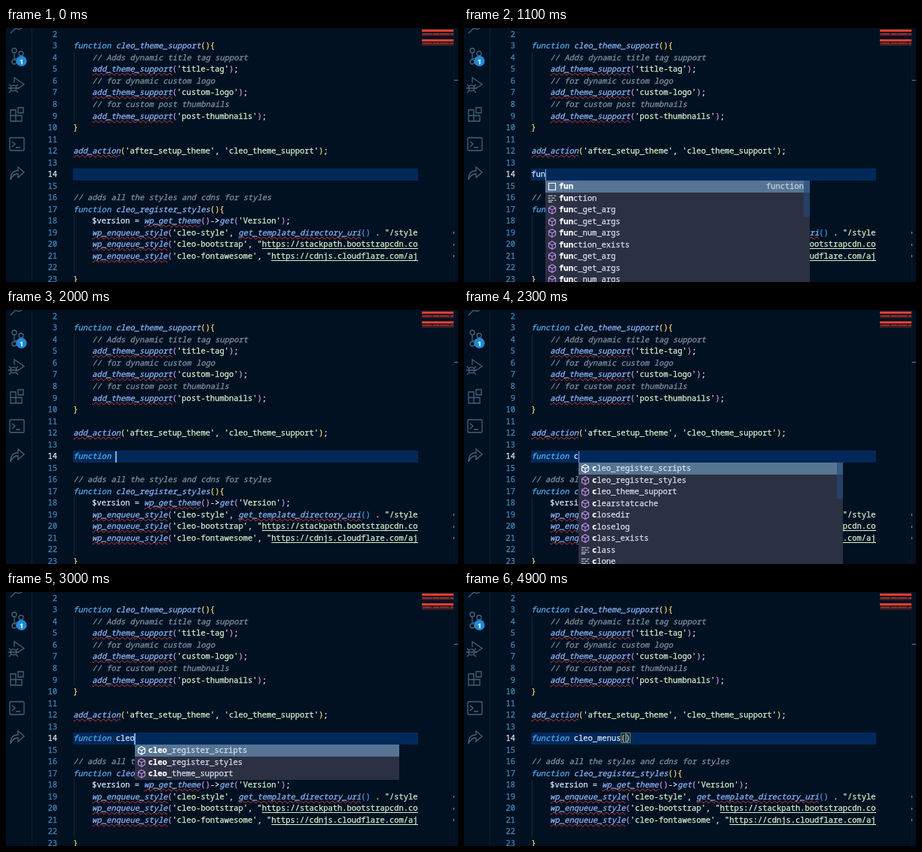
An HTML page that plays this animation: 600 px wide and 338 px high, repeating every 5000 ms.

```html
<!DOCTYPE html>
<html lang="en">
<head>
<meta charset="utf-8">
<title>Code editor</title>
<style>
html, body { margin: 0; width: 100%; height: 100%; overflow: hidden; background: #011122; }
#stage { position: relative; width: 600px; height: 338px; overflow: hidden; color: #d6e6f8;
  font: 10.45px/15.52px "Noto Sans Mono", "DejaVu Sans Mono", monospace; white-space: pre;
  font-variant-ligatures: none; -webkit-text-stroke: 0.25px; }
#stage div, #side, #map { position: absolute; }
#side, #map { left: 0; top: 0; }
#code { left: 0; top: 0; width: 547px; height: 338px; overflow: hidden; }
.num { right: 479px; color: #4287b8; }
.num.on { color: #d5ebff; }
.line { left: 89.3px; height: 15.52px; }
#active { width: 458px; background: #00295a; }
.guide { left: 90px; width: 1px; background: #10283c; }
.key { color: #55aef2; font-style: italic; }
.fn { color: #8db6fb; font-style: italic; }
.bad { text-decoration: underline wavy #c23a35 1px; text-underline-offset: 0.5px; text-decoration-skip-ink: none; }
.note { color: #84919e; font-style: italic; }
.str { color: #d3efc9; }
.url { text-decoration: underline; text-underline-offset: 2px; text-decoration-skip-ink: none; }
.b0 { color: #f5d76e; }
.b1 { color: #d58fd2; }
.b2 { color: #3f9cf0; }
.pair { color: #f5d76e; box-shadow: inset 0 0 0 1px #6b8268; }
#caret { top: 187.5px; width: 1.3px; height: 15px; background: #76aee8; }
#pop { top: 203px; background: #2c3043; color: #d6deeb; overflow: hidden; }
#pop .row { left: 0; width: 100%; height: 15.55px; }
#pop .row:first-child { background: #567594; }
#pop svg { position: absolute; left: 3px; top: 2px; width: 12px; height: 12px; }
#pop span { position: absolute; left: 18px; }
#pop b { color: #fff; }
#pop .hint { right: 8px; color: #c3d0de; }
#bar { right: 0; top: 0; width: 8px; height: 48px; background: #234a7ba0; }
</style>
</head>
<body>
<div id="stage">
  <svg id="side" width="36" height="338" fill="none" stroke="#44617a" stroke-width="1.3">
    <path d="M34.5 0V338" stroke="#0a2135" stroke-width="1"/>
    <path d="M6 7L13 0M12 0Q17 3 21 0"/>
    <circle cx="11" cy="30" r="3"/><circle cx="11" cy="45" r="3"/><circle cx="20" cy="34" r="3"/>
    <path d="M11 33V42M20 37Q19 40 12 41"/>
    <circle cx="20.500" cy="44" r="7" fill="#1f8ad8" stroke="none"/>
    <path d="M11 73V66L24 75L15 81"/><circle cx="10" cy="80" r="3.800"/>
    <path d="M4 75L7 78M16 75L13 78M3 80H17M4 86L7 83M16 86L13 83"/>
    <path d="M6 109H13V124H6ZM6 116.500H21V124H13M16 106H23V113H16Z"/>
    <rect x="5" y="146" width="19" height="17" rx="1"/><path d="M8 151L12 154.500L8 158M13 159H19"/>
    <path d="M6 202Q6 190 16 190V185L24 192L16 199V194Q9 194 6 202Z"/>
  </svg>
  <div style="left:18px;top:36.500px;font:bold 9px/15px 'Open Sans',sans-serif;color:#fff">1</div>
  <div id="code"></div>
  <svg id="map" width="600" height="338">
    <path d="M552 3.500H594M552 16.500H594" stroke="#e2402c" stroke-width="3"/>
    <path d="M552 8.500H594M552 21.500H594" stroke="#501f27" stroke-width="4"/>
    <path d="M553 8H594M553 20H594" stroke="#c9432f" stroke-dasharray="12 2 8 1"/>
    <path d="M594.500 0V338" stroke="#06192b"/>
    <path d="M595 69.500H600" stroke="#4a86b8"/>
    <path d="M594.500 271V274M594.500 287V290M594.500 302V305" stroke="#8095a5"/>
  </svg>
  <div id="caret"></div>
  <div id="pop"></div>
</div>
<script>
const LEFT = 89.3, CHAR = 6.27, ROW = 15.52, TOP = 16.4, FIRST = 2;
const source = `
function cleo_theme_support(){
    // Adds dynamic title tag support
    add_theme_support('title-tag');
    // for dynamic custom logo
    add_theme_support('custom-logo');
    // for custom post thumbnails
    add_theme_support('post-thumbnails');
}

add_action('after_setup_theme', 'cleo_theme_support');



// adds all the styles and cdns for styles
function cleo_register_styles(){
    $version = wp_get_theme()->get('Version');
    wp_enqueue_style('cleo-style', get_template_directory_uri() . "/style.css"
    wp_enqueue_style('cleo-bootstrap', "https://stackpath.bootstrapcdn.com/
    wp_enqueue_style('cleo-fontawesome', "https://cdnjs.cloudflare.com/ajax

}`.split('\n');

const $ = id => document.getElementById(id);
const span = (cls, text) => `<span class="${cls}">${text}</span>`;
const lineTop = n => TOP + (n - 3) * ROW;

function paint(line) {
  let depth = line[0] === ' ' ? 1 : 0;
  return line.replace(/(\/\/.*)|('.*?'|".*)|(function)|(\w+)(?=\()|([(){}])/g,
    (all, note, str, key, name, bracket, at) => {
      if (note) return span('note', all);
      if (str) return span('str', str.replace(/https.*/, url => span('url', url)));
      if (key) return span('key', all);
      if (bracket === '(') return span('b' + depth++, all);
      if (bracket === ')') return span('b' + --depth, all);
      if (bracket) return span('b' + depth, all);
      const known = /(function |->)$/.test(line.slice(0, at));
      return span(known ? 'fn' : 'fn bad', all);
    });
}

const guide = (from, to) =>
  `<div class="guide" style="top:${lineTop(from)}px;height:${(to - from + 1) * ROW}px"></div>`;
$('code').innerHTML = guide(4, 9) + guide(18, 22) + source.map((line, i) => {
  const n = i + FIRST, top = `style="top:${lineTop(n)}px"`;
  const on = n === 14;
  return `<div class="num${on ? ' on' : ''}" ${top}>${n}</div>` +
    `<div class="line" ${on ? 'id="active"' : ''} ${top}>${paint(line)}</div>`;
}).join('');

// Suggestion icons: colour and path
const icons = {
  s: ['#d6deeb', 'M2 2H14V14H2Z'],
  k: ['#d6deeb', 'M1 3H9M11 3H15M1 7H5M7 7H13M1 11H10M12 11H15M1 14H8'],
  m: ['#b98ae0', 'M8 1L14 4.5V11.500L8 15L2 11.500V4.500ZM2 4.500L8 8L14 4.500M8 8V15'],
  c: ['#ee9d28', 'M5 1L9 5L5 9L1 5ZM8 5H12M9 5V12H12M13 3L15 5L13 7L11 5ZM13 10L15 12L13 14L11 12Z'],
  e: ['#d6deeb', 'M1 3H15V13H1ZM4 6.500H12M4 9.500H12']
};
const list = text => text.split(' ').map(item => [item[0], item.slice(2)]);
const fun = list('s:fun k:function m:func_get_arg m:func_get_args m:func_num_args ' +
  'm:function_exists m:func_get_arg m:func_get_args m:func_num_args');
const func = list('k:function m:function_exists k:function m:function_exists ' +
  'c:BadFunctionCallException e:T_FUNCTION e:__FUNCTION__ c:ReflectionFunction c:ReflectionFunctionAbstract');
const own = list('m:cleo_register_scripts m:cleo_register_styles m:cleo_theme_support');
const cle = [...own, ['m', 'locale_lookup']];
const cl = [...own, ...list('m:clearstatcache m:closedir m:closelog m:class_exists k:class k:clone')];

// Time, typed text, suggestions, popup width
const steps = [
  [0, ''],
  [700, 'f', fun],
  [900, 'fu', fun, 362],
  [1100, 'fun', fun],
  [1400, 'func', fun.slice(1)],
  [1500, 'funct', func],
  [1600, 'functi', func, 417],
  [1700, 'functio', func],
  [1900, 'function', func, 366],
  [2000, 'function '],
  [2200, 'function c', cl],
  [2400, 'function cl', cl],
  [2500, 'function cle', cle],
  [2900, 'function cleo', own],
  [3400, 'function cleo_', own],
  [3500, 'function cleo_m', list('m:cleo_theme_support')],
  [3600, 'function cleo_me'],
  [3800, 'function cleo_menu'],
  [4000, 'function cleo_menus'],
  [4400, 'function cleo_menus'],
  [4900, 'function cleo_menus()']
];

function mark(name, query) {
  const at = name.toLowerCase().indexOf(query), end = at + query.length;
  if (at >= 0) return name.slice(0, at) + `<b>${name.slice(at, end)}</b>` + name.slice(end);
  let i = 0;
  return [...name].map(c => c === query[i] ? (i++, `<b>${c}</b>`) : c).join('');
}

function row([kind, name], i, query) {
  const [color, path] = icons[kind];
  return `<div class="row" style="top:${i * 15.55}px">` +
    `<svg viewBox="0 0 16 16" fill="none" stroke-width="1.500" stroke="${i ? color : '#fff'}"><path d="${path}"/></svg>` +
    `<span>${mark(name, query)}</span>${kind === 's' ? '<div class="hint">function</div>' : ''}</div>`;
}

function show([time, text, items, width = 351]) {
  const x = LEFT + text.length * CHAR;
  $('active').innerHTML = text.replace(/^function\b/, span('key', 'function'))
    .replace(/[()]/g, c => span('pair', c));
  $('caret').style.left = x - 0.4 + 'px';
  $('caret').hidden = !text || time >= 4400;
  const pop = $('pop');
  pop.hidden = !items;
  if (!items) return;
  pop.style.left = x + 'px';
  pop.style.width = width + 'px';
  pop.style.height = items.length * 15.55 + 'px';
  pop.innerHTML = items.map((item, i) => row(item, i, text.split(' ').pop())).join('') +
    (items.length > 7 ? '<div id="bar"></div>' : '');
}

let shown;
const start = performance.now();
function tick() {
  const t = (performance.now() - start) % 5000;
  const step = steps.findLast(s => s[0] <= t);
  if (step !== shown) show(shown = step);
  requestAnimationFrame(tick);
}
tick();
</script>
</body>
</html>
```
